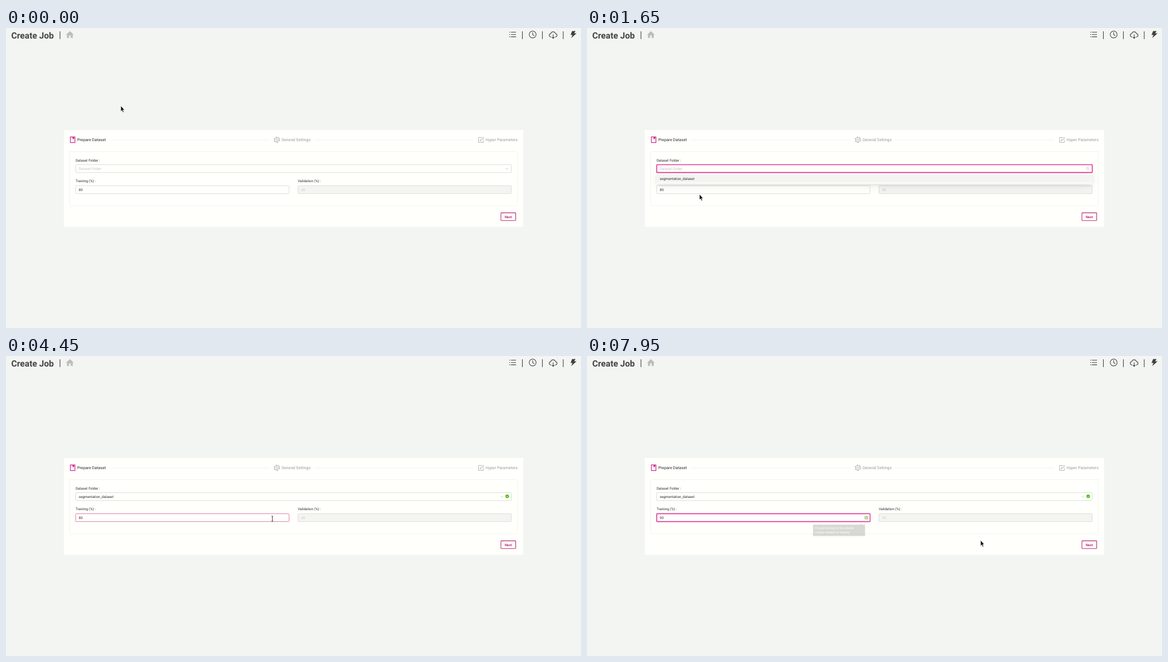
These frames come from a looping animation (1035x541 px, 8 s). An HTML page:

```html
<!DOCTYPE html>
<html lang="en">
<head>
<meta charset="utf-8">
<title>Create Job</title>
<style>
  html, body { margin: 0; width: 100%; height: 100%; overflow: hidden; background: #f3f5f2; }
  svg { display: block; }
  text { font: 6.3px Roboto, sans-serif; fill: #2b2b2b; text-rendering: geometricPrecision; white-space: pre; }
  .title { font-size: 15.6px; font-weight: 700; fill: #444; }
  .step { font-size: 7.2px; }
  .muted { fill: #999; }
  .hint { fill: #c3c3c1; }
  .tip text { fill: #fff; }
  .tip { filter: drop-shadow(0 1.5px 3px rgba(0,0,0,.16)); }
  .tip, #checkA, #checkB { transform-box: fill-box; transform-origin: center; }
  #menu { transform-origin: 0 262px; }
  .shade { filter: drop-shadow(0 2px 3.5px rgba(0,0,0,.1)) drop-shadow(0 4px 9px rgba(0,0,0,.06)); }
  .line { fill: none; stroke: #3f3f3f; stroke-width: 1.1; }
  .gray { fill: none; stroke: #a3a3a3; stroke-width: .8; }
  .box { fill: #fffffc; stroke: #d9d9d7; stroke-width: .9; }
  .caret { stroke: #222; stroke-width: .6; }
</style>
</head>
<body>
<svg width="1035" height="541" viewBox="0 0 1035 541">
  <defs>
    <g id="check">
      <circle r="3.3" fill="#52c41a"/>
      <path d="M-1.5 0L-.4 1.2L1.5 -1.1" fill="none" stroke="#fff" stroke-width=".7"/>
    </g>
  </defs>
  <rect width="1035" height="541" fill="#f3f5f2"/>

  <text class="title" x="9.6" y="19.3">Create Job</text>
  <path class="line" d="M97.2 6V20M929.5 6V20M965.5 6V20M1003 6V20"/>
  <path d="M115 5.6L122 12.2H120.2V18H116.6V13.6H113.4V18H109.8V12.2H108Z" fill="#bdbdbb"/>
  <path class="line" d="M909 7.5H918M909 11.7H918M909 15.9H918"/>
  <path class="line" d="M906 7.5H907.6M906 11.7H907.6M906 15.9H907.6" stroke-width="1.5"/>
  <circle class="line" cx="948" cy="11.7" r="6.2"/>
  <path class="line" d="M948 7.8V12L950.8 13.8"/>
  <path class="line" d="M981.6 16.2C976.6 16 976.8 10.6 980.6 10.2C981.6 5.8 988 5.8 989 10.2C993 10.6 993 16 988.2 16.2M984.9 11.5V18.5M982.7 16.4L984.9 18.6L987.1 16.4"/>
  <path d="M1019 5.5H1025.2L1022.6 9.6H1027L1017.4 18.2L1019.6 12.6H1016.2Z" fill="#3f3f3f"/>

  <rect x="104" y="184" width="827" height="174.4" fill="#fffffc"/>
  <path d="M187 202H474M555 202H841" stroke="#eeeeec" stroke-width=".8"/>
  <rect x="115.9" y="196.4" width="8.2" height="10.2" fill="none" stroke="#d01f8a" stroke-width="1.2"/>
  <path d="M119.8 196.4H122.6V200.8L121.2 199.8L119.8 200.8Z" fill="#d01f8a"/>
  <text class="step" x="128.2" y="204.4">Prepare Dataset</text>
  <g class="gray">
    <circle cx="487.5" cy="201.5" r="4.1"/>
    <circle cx="487.5" cy="201.5" r="4.8" stroke-width="1.1" stroke-dasharray="2.4 2.63"/>
    <circle cx="487.5" cy="201.5" r="1.8"/>
    <path d="M856 197.3H850.6V206.4H859.2V201.6M853.2 203.8L853.6 201.8L858.4 196.8L860 198.4L855.2 203.4Z"/>
  </g>
  <text class="step muted" x="495.9" y="204.4">General Settings</text>
  <text class="step muted" x="863.3" y="204.4">Hyper Parameters</text>

  <rect x="114.4" y="222.9" width="806.2" height="97.8" rx="1" fill="none" stroke="#efefed" stroke-width=".8"/>
  <text x="125.2" y="240.7">Dataset Folder :</text>
  <text x="125.2" y="278.3">Training (%) :</text>
  <text x="525.2" y="278.3">Validation (%) :</text>

  <rect id="folder" class="box" x="125.5" y="246.5" width="784" height="14.2" rx=".9"/>
  <text id="folderText" x="130.9" y="255.9"></text>
  <path id="caretA" class="caret" d="M0 250.2V257.2"/>
  <path id="down" class="gray" d="M-2 -1.2L0 1.3L2 -1.2"/>
  <g id="clear" transform="translate(901.6 253.7)">
    <circle r="2.7" fill="#b8b8b6"/>
    <path d="M-1 -1L1 1M1 -1L-1 1" stroke="#fff" stroke-width=".6"/>
  </g>
  <path id="search" class="gray" style="stroke:#c3c3c1" d="M902.4 254.6L903.8 256.2M902.9 253.1a1.8 1.8 0 1 0-3.6 0a1.8 1.8 0 1 0 3.6 0"/>
  <g transform="translate(902.2 253)"><use id="checkA" href="#check"/></g>

  <rect id="train" class="box" x="125.5" y="284.4" width="384" height="14.2" rx=".9"/>
  <text id="trainText" x="130.9" y="294.2"></text>
  <path id="caretB" class="caret" d="M138.1 288.2V295.2"/>
  <g transform="translate(502.8 291.5)"><use id="checkB" href="#check"/></g>
  <g id="spinner">
    <rect x="499.8" y="285.3" width="9" height="12.4" fill="#fffffc"/>
    <path class="gray" style="stroke:#d9d9d7" d="M499.8 285V298M499.8 293.2H509"/>
    <path class="gray" d="M503.2 290.2L504.6 288.6L506 290.2M503.2 294.8L504.6 296.4L506 294.8"/>
  </g>
  <rect class="box" x="525.5" y="284.4" width="384" height="14.2" rx=".9" style="fill:#f4f4f1"/>
  <text id="validText" class="hint" x="530.9" y="294.2"></text>

  <rect x="890.9" y="333.4" width="26.6" height="13.8" rx=".9" fill="#fffffc" stroke="#bd2470" stroke-width="1.1"/>
  <text x="904.2" y="342.5" text-anchor="middle" style="font-weight:500;fill:#ad1a62">Next</text>

  <g id="menu">
    <rect class="shade" x="125.5" y="262.4" width="784.3" height="18.4" rx=".9" fill="#fffffc"/>
    <rect x="125.5" y="264.3" width="784.3" height="14.4" fill="#f4f4f1"/>
    <text x="130.9" y="273.5">segmentation_dataset</text>
  </g>
  <g id="tipA" class="tip">
    <path d="M798 209.2H909.4V242.8H903.2L901 245L898.8 242.8H798Z" fill="#40403f"/>
    <text x="801.5" y="219">The name of the folder containing the</text>
    <text x="801.5" y="228.5">images and labels to be used in the</text>
    <text x="801.5" y="238">training job</text>
  </g>
  <g id="tipB" class="tip">
    <path d="M398 302.6H498.8L501 300.6L503.2 302.6H509.4V326.6H398Z" fill="#40403f"/>
    <text x="401.8" y="312">The percentage of the dataset</text>
    <text x="401.8" y="321.4">images needed for training</text>
  </g>

  <g id="cursor" stroke="#fff" stroke-width=".4">
    <path id="arrow" d="M0 0V9.6L2.1 7.7L3.6 11.4L5.1 10.8L3.6 7.2H6.4Z" fill="#111"/>
    <path id="beam" d="M-1.6 -4.6H-.5L0 -4.2L.5 -4.6H1.6M0 -4.2V4.2M-1.6 4.6H-.5L0 4.2L.5 4.6H1.6" fill="none" stroke="#222" stroke-width=".9"/>
    <path id="hand" d="M-.9 .4Q0 -.5 .9 .4V3.2L4 4Q5 4.4 4.8 5.6L4.2 9.8H-.2L-2.6 6.6Q-2.6 5.2 -.9 6Z" fill="#111"/>
  </g>
</svg>
<script>
const $ = id => document.getElementById(id);
const ramp = (t, start, length) => Math.min(1, Math.max(0, (t - start) / length));
const ease = p => p * p * (3 - 2 * p);
const show = (id, on) => $(id).style.opacity = +on;

// time, x, y, pointer shape from that time on
const path = [
  [0, 206.8, 140.6, 'arrow'], [199, 206.8, 140.6, 'arrow'], [200, 206.8, 143.8, 'arrow'],
  [350, 206.8, 143.8, 'arrow'], [700, 178, 247, 'beam'], [850, 172, 257, 'beam'],
  [1150, 172, 257, 'beam'], [1250, 175.2, 262.6, 'hand'], [1400, 192, 284, 'arrow'],
  [1500, 202.5, 300, 'arrow'], [2900, 202.5, 300, 'arrow'], [2950, 169.5, 265, 'beam'],
  [3000, 152, 244, 'beam'], [3100, 165, 263, 'hand'], [3150, 170, 267, 'hand'],
  [3450, 170, 267, 'hand'], [3500, 182, 282, 'arrow'], [3850, 310, 340, 'arrow'],
  [4150, 440, 314, 'arrow'], [4300, 440, 314, 'arrow'], [4400, 468, 297, 'beam'],
  [4450, 479.4, 293.4, 'beam'], [4600, 502, 289, 'hand'], [4750, 503.6, 287, 'hand'],
  [7650, 503.6, 287, 'hand'], [7700, 522, 291, 'arrow'], [7950, 708.6, 332.6, 'arrow'], [8000, 708.6, 332.6, 'arrow']
];
const clicks = [5200, 5400, 5550, 5800, 6400, 6600, 6750, 6950, 7250, 7400];
const keys = [2050, 2250, 2400];
const carets = [131.2, 134.2, 137.5, 141];

function moveCursor(t) {
  const i = path.findLastIndex(k => k[0] <= t);
  const [t0, x0, y0, shape] = path[i], [t1, x1, y1] = path[i + 1];
  const p = ramp(t, t0, t1 - t0);
  $('cursor').setAttribute('transform', `translate(${x0 + (x1 - x0) * p} ${y0 + (y1 - y0) * p})`);
  for (const id of ['arrow', 'beam', 'hand']) show(id, id === shape);
}

function zoom(id, amount, from) {
  $(id).style.opacity = amount;
  $(id).style.transform = `scale(${from + (1 - from) * amount})`;
}

function border(id, hover, focus) {
  const mix = (a, b) => Math.round(a + (b - a) * hover);
  $(id).style.stroke = `rgb(${mix(217, 229)},${mix(217, focus ? 55 : 70)},${mix(215, 150)})`;
  $(id).style.strokeWidth = .9 + .8 * focus;
}

function draw(t) {
  moveCursor(t);

  const chosen = t >= 3350;
  const typed = keys.filter(k => k <= t).length;
  const folder = $('folderText');
  folder.textContent = chosen ? 'segmentation_dataset' : 'seg'.slice(0, typed) || 'Dataset Folder';
  folder.setAttribute('class', chosen || typed ? '' : 'hint');
  border('folder', ease(ramp(t, 650, 250)) * (1 - ease(ramp(t, 3350, 300))),
    ramp(t, 1000, 150) * (1 - ramp(t, 3300, 250)));
  $('caretA').setAttribute('transform', `translate(${carets[typed]})`);
  show('caretA', t >= 1050 && t < 1650 || t >= 2050 && t < 3000);
  show('down', t < 1050 || chosen);
  $('down').setAttribute('transform', `translate(${chosen ? 892.5 : 901.6} 253.9)`);
  $('down').style.stroke = '#bcbcba';
  show('clear', t >= 1050 && t < 1300);
  show('search', t >= 1300 && !chosen);
  zoom('checkA', ease(ramp(t, 3350, 300)), 0);

  const open = ease(ramp(t, 1000, 200)) * (1 - ease(ramp(t, 3350, 200)));
  $('menu').style.opacity = open;
  $('menu').style.transform = `scaleY(${.8 + .2 * open})`;
  zoom('tipA', ramp(t, 750, 100) * (1 - ramp(t, 1350, 100)), .8);

  const value = 80 + clicks.filter(c => c <= t).length;
  $('trainText').textContent = value;
  $('validText').textContent = 100 - value;
  border('train', ease(ramp(t, 4350, 150)), ramp(t, 5150, 150));
  show('caretB', t >= 5200 && t < 7700);
  zoom('checkB', ease(ramp(t, 5200, 300)), 0);
  show('spinner', ramp(t, 4550, 240) * (1 - ramp(t, 7830, 240)));
  zoom('tipB', ramp(t, 4550, 100) * (1 - ramp(t, 7870, 100)), .8);
}

const start = performance.now();
function tick() {
  const t = (performance.now() - start) % 8000;
  draw(Math.floor(t / 50) * 50);
  requestAnimationFrame(tick);
}
tick();
</script>
</body>
</html>
```
